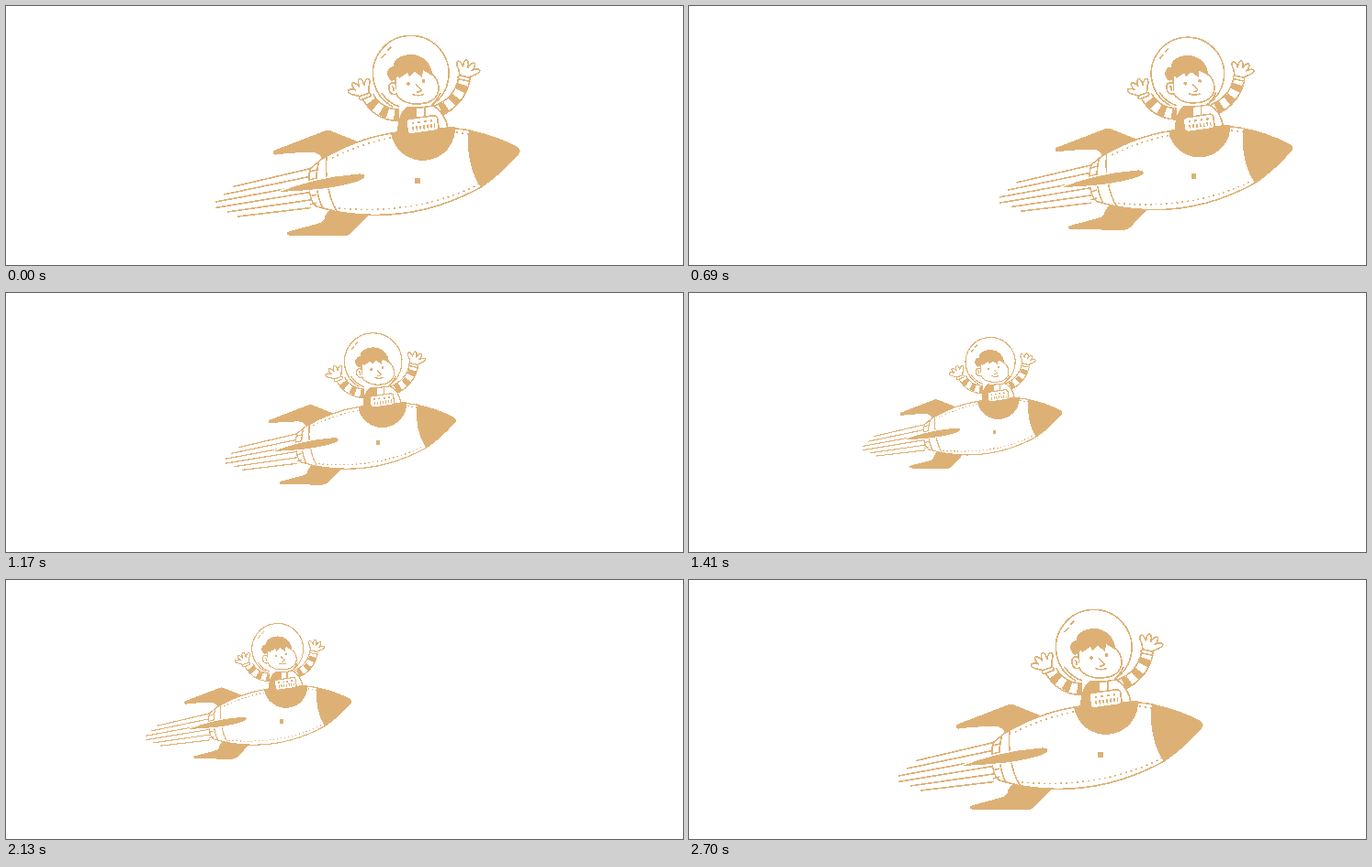
An HTML page for the animation above (3370 ms loop, 737x283 px).

```html
<!DOCTYPE html>
<html lang="en">
<head>
<meta charset="utf-8">
<title>Rocket ride</title>
<style>
  html, body { margin: 0; width: 100%; height: 100%; overflow: hidden; background: #fff; }
  svg { display: block; width: 737px; height: 283px; shape-rendering: crispEdges; }
  #rocket { --w: 1.6px; fill: none; stroke: #ddb176; stroke-width: var(--w); stroke-linejoin: round; }
  .solid { fill: #ddb176; stroke: none; }
  .paper { fill: #fff; }
  .stitch { stroke-dasharray: 2 4; }
  .sleeve { stroke-width: calc(11px + 2 * var(--w)); }
  .sleeve.inside { stroke: #fff; stroke-width: 11px; }
  .sleeve.bands { stroke-width: 11px; stroke-dasharray: 0 6 1.6; }
  .halo { stroke: #fff; stroke-width: 3px; paint-order: stroke; fill: #ddb176; }
  .lamps { stroke-width: 2.6px; stroke-dasharray: 2.6 4.2; }
  .bars { stroke-width: 4.5px; stroke-dasharray: 1.6 2.4; }
</style>
</head>
<body>
<svg viewBox="0 0 737 283">
  <defs>
    <path id="left-arm" d="M394 99C400 110 411 119 428 119.500"/>
    <path id="right-arm" d="M499 80C495 97 486 108 469 115"/>
    <g id="glove">
      <path id="hand" class="paper"/>
      <rect class="paper" x="-6.500" y="0" width="13" height="4" rx="2"/>
    </g>
  </defs>

  <g id="rocket">
    <path id="streaks"/>

    <!-- outer fins -->
    <path class="solid" d="M291 161Q290 158 294 157L347 136.500Q350 135 354 136.500L385 149L344 167.500Q342 160 333 160Q312 160 294 162.500Q291 163 291 161Z"/>
    <path class="solid" d="M306 249Q305 247 309 246L339 238Q347 236 347 230L352 223H400L376 248Q372 251.500 367 251.500L309 250.500Q306 251 306 249Z"/>

    <!-- helmet -->
    <path d="M421 110A41.300 41.300 0 1 1 463 108.500M409 95Q416 106 428 110M473 95Q470 102 465 107"/>
    <path d="M409 57L413 52M415 49L419 45"/>

    <!-- arms -->
    <g id="arms"></g>
    <use href="#glove" transform="translate(390 97) rotate(-21)"/>
    <use href="#glove" transform="translate(499 77) rotate(12) scale(-1 1)"/>

    <!-- head -->
    <path class="paper" d="M424 94C427 103 437 107 447 107C463 107 471 100 471 90C471 83 467 77 463 74L440 62L424 78Z"/>
    <path class="paper" d="M424 85C419 82 416 86 417 90C417 95 421 98 425 96M420 88Q423 88 422 93"/>
    <path class="solid" d="M420 82C415 79 414 73 416 70C417 67 420 66 422 66C421 59 430 53 441 53C454 53 464 63 464 76L454 70L453 78L445 72L439 77L437 73L428 79L426 76Q424 81 420 82Z"/>
    <circle class="solid" cx="438" cy="85" r="1.900"/>
    <circle class="solid" cx="454.500" cy="82" r="1.900"/>
    <path d="M446 86Q450 89 452 92Q450 95 447 94M442 96.500Q449 99 455 96.500"/>

    <!-- hull -->
    <path class="paper" d="M344 167C368 153 394 143 420 139C445 134 478 131 505 136L517 198C472 223 418 235 359 224.500L338 219Q330 213 330 196Q329 182 332 177Z"/>
    <path d="M349 165C347 185 351 209 360 224M341 169C336 185 337 206 345 221"/>
    <path id="ribs"/>
    <path class="stitch" d="M355 166Q385 151 419 144M490 138L504 140M362 221C415 226 470 218 514 195"/>
    <path class="solid" d="M504 135.500Q530 140 557 154Q562 158 558 162Q539 184 517 199C505 181 501 157 504 135.500Z"/>
    <rect class="solid" x="444.500" y="187.500" width="6" height="6"/>
    <path class="halo" d="M298 203C320 194 350 186 384 183.500Q391 183 390.500 187C389 191 370 196 345 199.500Q322 202 298 203Z"/>

    <!-- torso, cockpit and chest panel -->
    <path class="paper" d="M427 138C427 124 431 115 437 111Q450 112 465 109Q478 116 481 134Z"/>
    <path class="solid" d="M426 138C427 124 431 115 437 111H447V138Z"/>
    <path d="M456 111V121"/>
    <path class="solid" d="M419 138.500A35.200 35.200 0 0 0 489 131.500Z"/>
    <g transform="rotate(-8 453.500 130)">
      <rect class="paper" x="436.500" y="121.500" width="34" height="16.500" rx="4"/>
      <path class="lamps" d="M442 126.500H466"/>
      <path class="bars" d="M442 132.500H467"/>
    </g>
  </g>
</svg>
<script>
  const byId = id => document.getElementById(id);
  const range = n => [...Array(n).keys()];
  const LOOP = 3370, TICK = 30, LEFT = 227, TOP = 32;

  // Speed lines: free tips on the left, evenly spaced along the tail.
  const tips = [[247, 197.5], [237, 206], [228, 214], [228, 220.5], [241, 225], [252, 230]];
  byId('streaks').setAttribute('d',
    tips.map((tip, i) => `M${tip}L332 ${177.5 + 8.6 * i}`).join(''));

  byId('ribs').setAttribute('d',
    range(5).map(i => `M331 ${181 + 9 * i}l7 -2`).join(''));

  // Four finger lobes fanned around the wrist.
  const polar = (deg, r) => {
    const a = deg * Math.PI / 180;
    return `${r * Math.sin(a)} ${-r * Math.cos(a)} `;
  };
  const fingers = range(4).map(i => {
    const a = 30 * i - 55;
    return `C${polar(a - 10, 21)}${polar(a + 10, 21)}${polar(a + 15, 10.5)}`;
  });
  byId('hand').setAttribute('d', `M-5 0L${polar(-70, 10.5)}${fingers.join('')}L5 0Z`);

  // Each sleeve is one curve stroked three times: outline, inside, bands.
  byId('arms').innerHTML = ['left', 'right'].map(side =>
    ['', 'inside', 'bands'].map(layer =>
      `<use href="#${side}-arm" class="sleeve ${layer}"/>`).join('')).join('');

  // Straight moves between poses, then a rest until the loop ends.
  const poses = [
    { at: 0, x: 0, y: 0, s: 1 },
    { at: 600, x: 129, y: 0, s: 1 },
    { at: 1800, x: -120, y: 24, s: 0.49 },
    { at: 2700, x: 0, y: 0, s: 1 },
    { at: LOOP, x: 0, y: 0, s: 1 }
  ];

  function poseAt(time) {
    const i = poses.findIndex(p => p.at > time);
    const a = poses[i - 1], b = poses[i];
    const k = (time - a.at) / (b.at - a.at);
    const mix = key => a[key] + (b[key] - a[key]) * k;
    return { x: mix('x'), y: mix('y'), s: mix('s') };
  }

  const rocket = byId('rocket');

  function draw() {
    const time = Math.floor(performance.now() % LOOP / TICK) * TICK;
    const { x, y, s } = poseAt(time);
    rocket.setAttribute('transform',
      `translate(${LEFT + x} ${TOP + y}) scale(${s}) translate(${-LEFT} ${-TOP})`);
    rocket.style.setProperty('--w', Math.max(1.6, 1.1 / s) + 'px');
    requestAnimationFrame(draw);
  }
  draw();
</script>
</body>
</html>
```
